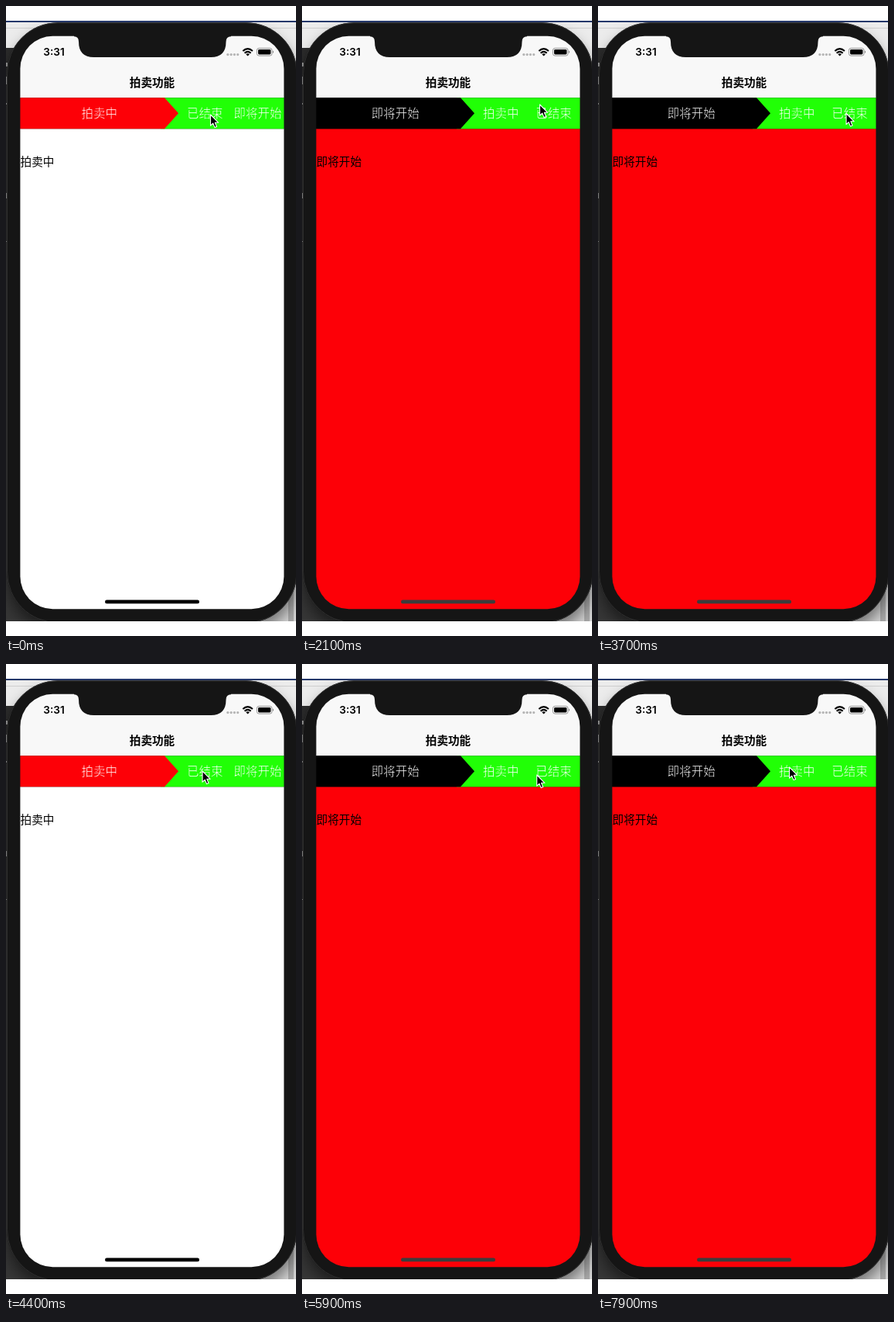
Write an HTML page that moves like this. It is 375 px wide and 812 px high and loops after 8000 ms.

```html
<!DOCTYPE html>
<html lang="zh-CN">
<head>
<meta charset="utf-8">
<title>拍卖功能</title>
<style>
  html, body { margin: 0; width: 100%; height: 100%; overflow: hidden; background: #fff; }
  svg { display: block; width: 375px; height: 812px; }
  text { font-family: "Noto Sans CJK SC", "Noto Sans CJK", "Noto Sans CJK JP", sans-serif; }
  /* a thin outline in the background colour gives the light weight */
  .tab { font-size: 15.45px; font-weight: 300; fill: #fff; stroke: #21ff06; stroke-width: .4px; text-anchor: middle; }
  .title { font-size: 14.6px; font-weight: 700; text-anchor: middle; }
  .clock { font: 600 13.6px Inter, sans-serif; text-anchor: middle; }
</style>
</head>
<body>
<svg viewBox="0 0 375 812">
  <defs>
    <clipPath id="stage"><rect y="19" width="375" height="774"/></clipPath>
    <clipPath id="screen"><rect x="18.4" y="38.8" width="341" height="738.4" rx="42"/></clipPath>
    <filter id="shadow" x="-20%" y="-10%" width="140%" height="120%">
      <feGaussianBlur stdDeviation="9"/>
    </filter>
  </defs>

  <g clip-path="url(#stage)">
    <!-- desktop behind the phone -->
    <rect y="19" width="375" height="774" fill="#ececec"/>
    <rect y="28" width="375" height="1" fill="#cfcfcf"/>
    <rect y="54" width="80" height="739" fill="#2b2b2b"/>
    <rect y="303" width="80" height="490" fill="#363636"/>
    <g fill="#999">
      <rect y="73" width="2" height="5"/>
      <rect y="91" width="2" height="10"/>
      <rect y="125" width="2" height="2"/>
      <rect y="241" width="2" height="7"/>
      <rect y="303" width="2" height="1"/>
    </g>
    <rect x="300" y="700" width="75" height="93" fill="#d4d4d4"/>
    <rect x="365" y="700" width="7" height="93" fill="#a8a8a8"/>
    <rect x="1" y="32" width="375.6" height="774" rx="66" fill-opacity=".45" filter="url(#shadow)"/>
    <rect y="19" width="375" height="2" fill="#26396b"/>

    <rect x="1" y="21.3" width="375.6" height="774" rx="66" fill="#151515"/>
    <rect x="1.5" y="21.8" width="374.6" height="773" rx="65.5" fill="none" stroke="#303030"/>
  </g>

  <g clip-path="url(#screen)">
    <rect x="18" y="38" width="342" height="80.3" fill="#f8f8f8"/>
    <rect id="page" x="18" y="158.3" width="342" height="620"/>
    <rect x="200" y="118.3" width="160" height="40" fill="#21ff06"/>
    <path id="arrow" d="M18 118.3H205L223 138.3L205 158.3H18Z"/>
    <text id="tab0" class="tab" x="120.7" y="144.4"></text>
    <text id="tab1" class="tab" x="257.2" y="144.4"></text>
    <text id="tab2" class="tab" x="325.5" y="144.4"></text>
    <text id="body" x="18.6" y="205.6"></text>
    <rect id="home" x="128" y="765.6" width="122" height="4.6" rx="2.3"/>
  </g>

  <!-- notch and status bar -->
  <path d="M88 38H291V39.3Q284.5 39.5 284.5 46Q284.5 66 265 66H113.5Q94 66 94 46Q94 39.5 88 39.3Z" fill="#151515"/>
  <text class="clock" x="62" y="64.3">3:31</text>
  <g fill="#b4b4b4">
    <circle cx="286.8" cy="62.6" r="1.6"/><circle cx="291.1" cy="62.6" r="1.6"/>
    <circle cx="295.4" cy="62.6" r="1.6"/><circle cx="299.7" cy="62.6" r="1.6"/>
  </g>
  <g fill="none" stroke="#000" stroke-width="2.1">
    <path d="M306.3 58.1Q312.6 52.3 318.9 58.1"/>
    <path d="M308.6 60.7Q312.6 57 316.6 60.7"/>
  </g>
  <path d="M310.3 62.2Q312.6 60.4 314.9 62.2L312.6 64.5Z"/>
  <rect x="324.4" y="54.4" width="19.6" height="9.7" rx="2.7" fill="none" stroke="#8c8c8c" stroke-width=".9"/>
  <rect x="326" y="56" width="16.4" height="6.5" rx="1.4"/>
  <path d="M345 57.5Q347.3 59.2 345 61Z" fill="#8c8c8c"/>
  <text class="title" x="189" y="104">拍卖功能</text>

  <path id="cursor" d="M0 0V14.2L3.2 11.2L5.5 16.6L8 15.5L5.8 10.3H10.2Z" stroke="#fff" stroke-width="1.1" stroke-linejoin="round"/>
</svg>

<script>
const LOOP = 8000, STEP = 100;
const RED = '#fd0007', GREEN = '#21ff06';

const views = {
  live:  { tabs: ['拍卖中', '已结束', '即将开始'], arrow: RED, page: '#fff', body: '拍卖中', size: 14.6, home: '#000' },
  soon:  { tabs: ['即将开始', '拍卖中', '已结束'], arrow: '#000', page: RED, body: '即将开始', size: 14.6, home: '#3c3c3c' },
  ended: { tabs: ['已结束', '拍卖中', '即将开始'], arrow: '#6e6e6e', page: GREEN, body: '已经结束', size: 15.2, home: '#000' }
};

// Taps run middle, middle, right: live -> ended -> soon -> live
const taps = [
  [0, 'live'], [500, 'ended'], [1500, 'soon'],
  [2400, 'live'], [2700, 'ended'], [3500, 'soon'],
  [4200, 'live'], [4600, 'ended'], [5500, 'soon'],
  [6300, 'live'], [6700, 'ended'], [7400, 'soon']
];

// [time, x, y] of the pointer tip
const path = [
  [0, 264.5, 140], [600, 264.5, 140], [1300, 318, 138], [1800, 318, 138],
  [2100, 307.5, 127], [2400, 253.7, 139], [2800, 253.7, 139],
  [3300, 321, 138.5], [3700, 321, 138.5],
  [4100, 254, 138], [4700, 254, 138], [5000, 298.5, 135.5],
  [5300, 303.7, 143], [5900, 303.7, 143],
  [6200, 252, 138], [6800, 252, 138],
  [7200, 314, 138], [7500, 314, 138], [7900, 247.5, 133]
];

const $ = id => document.getElementById(id);
const lastAt = (rows, t) => rows.findLastIndex(row => row[0] <= t);
const ease = p => p * p * (3 - 2 * p);

function pointer(t) {
  const i = lastAt(path, t), a = path[i], b = path[i + 1] || a;
  const p = b === a ? 0 : ease((t - a[0]) / (b[0] - a[0]));
  return [1, 2].map(k => a[k] + (b[k] - a[k]) * p);
}

let shown;
function show(name) {
  if (name === shown) return;
  shown = name;
  const v = views[name];
  v.tabs.forEach((label, i) => { $('tab' + i).textContent = label; });
  $('tab0').style.stroke = v.arrow;
  $('arrow').setAttribute('fill', v.arrow);
  $('page').setAttribute('fill', v.page);
  $('home').setAttribute('fill', v.home);
  $('body').textContent = v.body;
  $('body').setAttribute('font-size', v.size);
}

function draw(now) {
  const t = Math.floor(now % LOOP / STEP) * STEP;
  show(taps[lastAt(taps, t)][1]);
  $('cursor').setAttribute('transform', `translate(${pointer(t)})`);
}

let start;
function tick(now) {
  start ??= now;
  draw(now - start);
  requestAnimationFrame(tick);
}
draw(0);
requestAnimationFrame(tick);
</script>
</body>
</html>
```
